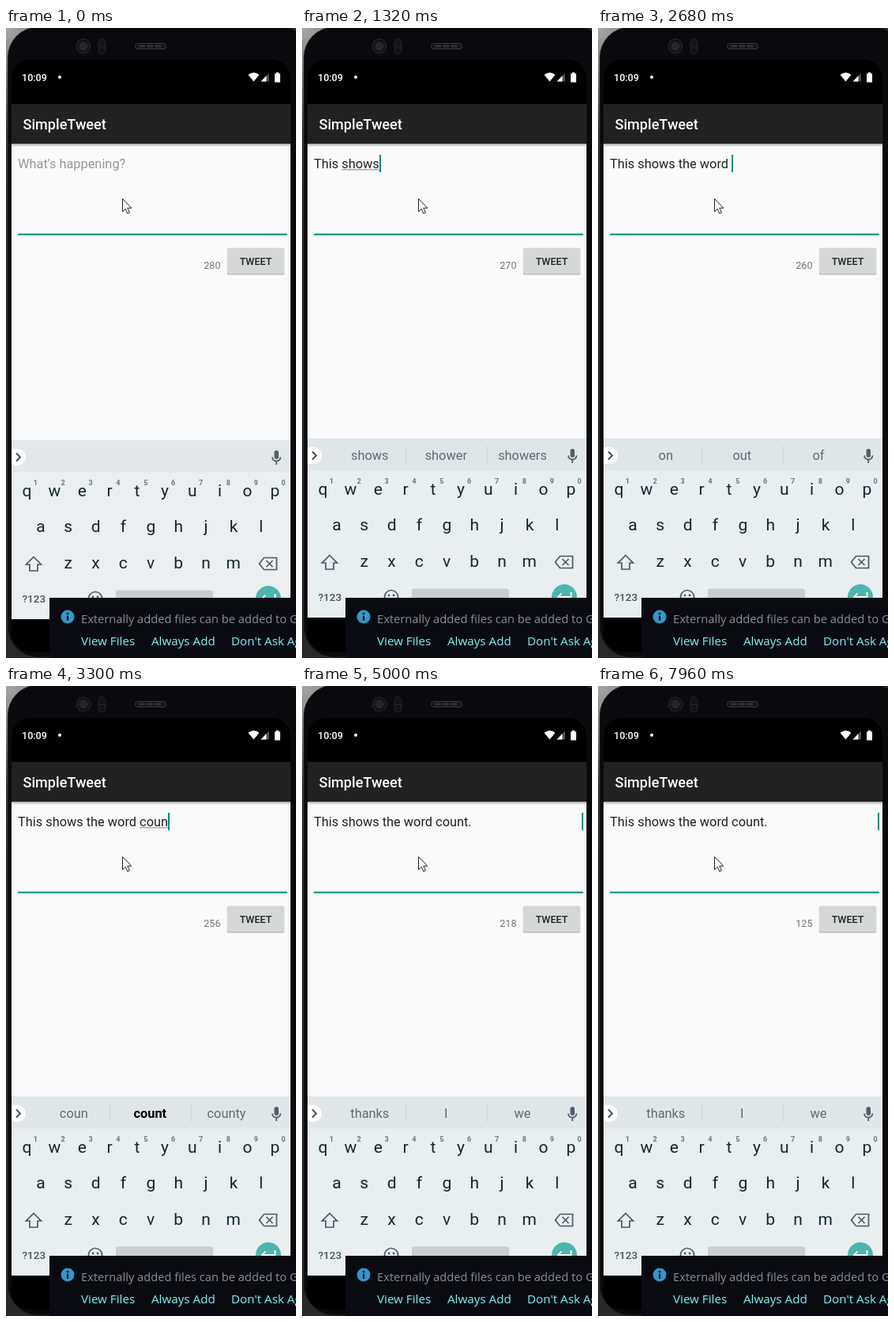
Recreate the animation shown at these times as an HTML page. Size 367x795 px, loop 8000 ms.

```html
<!DOCTYPE html>
<html lang="en">
<head>
<meta charset="utf-8">
<title>Character count</title>
<style>
  html, body { margin: 0; width: 100%; height: 100%; overflow: hidden; background: #0a0a0c; }
  svg { display: block; width: 367px; height: 795px; font-family: Roboto, sans-serif; }
  text { white-space: pre; }
  .mid { text-anchor: middle; }
  .med { font-weight: 500; }
  .key { font-size: 21px; fill: #12262f; }
  .hint { font-size: 9px; font-weight: 700; fill: #6a777e; }
  .body { font-size: 16.35px; }
  .small { font-size: 12.57px; }
  .line { fill: none; stroke: #4b5a63; stroke-width: 1.7; }
  .toast { font-family: "Open Sans", "Noto Sans", sans-serif; font-size: 15.2px; fill: #80f0f8; }
</style>
</head>
<body>
<svg viewBox="0 0 367 795">
  <defs>
    <linearGradient id="shade" x2="0" y2="1">
      <stop stop-color="#000" stop-opacity=".32"/>
      <stop offset="1" stop-color="#000" stop-opacity="0"/>
    </linearGradient>
    <radialGradient id="rim" gradientUnits="userSpaceOnUse" cx="0" cy="0" r="260">
      <stop stop-color="#a6a6a6"/>
      <stop offset=".2" stop-color="#7c7c7e"/>
      <stop offset=".5" stop-color="#3c3c3f"/>
      <stop offset="1" stop-color="#29292c"/>
    </radialGradient>
  </defs>

  <!-- phone body -->
  <rect width="367" height="795" fill="url(#rim)"/>
  <rect x="2.500" y="-1" width="385" height="795" rx="38" fill="#0a0a0c" stroke="#1c1c1e"/>
  <circle cx="98" cy="23" r="9" fill="#141416" stroke="#29292c"/>
  <circle cx="98" cy="23" r="4.500" fill="#24252b" stroke="#34353c"/>
  <rect x="117" y="14" width="9" height="19" rx="4.500" fill="#121214" stroke="#242427"/>
  <path d="M117 23.500h9" stroke="#242427"/>
  <rect x="163.500" y="19.500" width="39" height="7" rx="3.500" fill="#141416" stroke="#39393c"/>
  <path d="M168 23h30" stroke="#333336" stroke-width="3" stroke-dasharray="8 2"/>
  <rect x="7" y="40" width="353" height="747" rx="24"/>

  <!-- status bar -->
  <g fill="#fff">
    <text class="small med" x="20" y="67">10:09</text>
    <circle cx="68" cy="62" r="2"/>
    <path d="M306.500 59Q313.500 53.500 320.500 59L313.500 67.500z"/>
    <path d="M322.500 67.500L333 56.500V67.500z" fill-opacity=".3"/>
    <path d="M322.500 67.500L329.500 60.200V67.500z"/>
    <path d="M340 57.500h2v-1.500h3v1.500h2V68.500h-7z"/>
  </g>

  <!-- app -->
  <rect x="7" y="96" width="353" height="648" fill="#fafafa"/>
  <rect x="7" y="96" width="353" height="50" fill="#212121"/>
  <rect x="7" y="146" width="353" height="4" fill="url(#shade)"/>
  <text class="med" x="21.500" y="128" font-size="18.100" fill="#fff">SimpleTweet</text>
  <text id="note" class="body" x="15" y="177"></text>
  <rect id="under" y="178.300" height="1" fill="#212121" fill-opacity=".55"/>
  <rect id="caret" y="160" width="2" height="22" fill="#00897b"/>
  <rect x="15" y="259.500" width="341" height="2" fill="#00897b"/>
  <text id="count" class="small" x="250.300" y="304" fill="#757575"></text>
  <rect x="279.500" y="278" width="73" height="34" rx="2" fill="#000" fill-opacity=".1"/>
  <rect x="280" y="278.500" width="72" height="32.800" rx="2" fill="#000" fill-opacity=".17"/>
  <rect x="280" y="277.500" width="72" height="32.500" rx="2" fill="#d6d7d7"/>
  <text class="small med mid" x="316" y="299" fill="#212121">TWEET</text>

  <!-- keyboard -->
  <g id="board">
    <rect id="pad" x="7" y="518" width="353" height="226"/>
    <rect id="strip" x="7" y="518" width="353" height="40.500"/>
    <path d="M7 529h7.500a10.500 10.500 0 0 1 0 21H7z" fill="#fff"/>
    <path d="M13 534.500l5 5-5 5" fill="none" stroke="#37474f" stroke-width="1.800"/>
    <path id="bars" d="M131.500 528v22M234 528v22" stroke="#c6cdd1"/>
    <g id="words"></g>
    <rect x="339.500" y="531" width="5.500" height="11" rx="2.750" fill="#546068"/>
    <path class="line" d="M337 539.500a5.200 5.200 0 0 0 10.400 0M342.200 545v4"/>
    <g id="keys"></g>
    <path class="line" d="M35 665.500L44.500 675H40v8H30v-8h-4.500z"/>
    <path class="line" d="M326.500 666.500H342.500V681.500H326.500L320.500 674zM329.500 670l8 8m0-8l-8 8"/>
    <text class="med" x="20.500" y="723" font-size="13.500" fill="#45545d">?123</text>
    <circle class="line" cx="113" cy="718" r="8.500"/>
    <circle cx="110" cy="716" r="1.400" fill="#4b5a63"/>
    <circle cx="116" cy="716" r="1.400" fill="#4b5a63"/>
    <rect x="139" y="707.500" width="123" height="24" rx="3" fill="#c8ced2"/>
    <circle cx="332" cy="718" r="16" fill="#4db6ac"/>
    <path d="M340.500 712v6H324m4.500-4.500l-4.500 4.500 4.500 4.500" fill="none" stroke="#fff" stroke-width="1.900"/>
  </g>

  <!-- editor notice -->
  <rect x="55" y="719" width="312" height="76" fill="#0a0b11"/>
  <circle cx="78" cy="743" r="8.500" fill="#3794c8"/>
  <path d="M78 738v2.200M78 741.800v6" stroke="#0a0b11" stroke-width="2.200"/>
  <text class="toast" x="95" y="751" style="font-size:14.700px;fill:#898c95">Externally added files can be added to Git</text>
  <text class="toast" x="95" y="779">View Files</text>
  <text class="toast" x="184" y="779">Always Add</text>
  <text class="toast" x="285" y="779">Don't Ask Again</text>

  <path d="M147.500 215.500v16.300l3.700-3.600 2.500 5.800 2.600-1.100-2.500-5.700h5z" fill="#fff" stroke="#222" stroke-width="1"/>
</svg>
<script>
const LOOP = 8000;
const SENTENCE = "This shows the word count.";
const HOLD = 3970;
const RATE = 0.0316; // spaces per ms while the space bar is held

// time, typed length, suggestions (* marks the bold one)
const typing = [
  [0, 0, ""],
  [120, 1, "T,The,This"],
  [240, 2, "Th,*The,This"],
  [360, 3, "Thi,*This,Think"],
  [480, 4, "This,Thus,This is"],
  [600, 4, "This,This is,Thistle"],
  [720, 5, "was,is,morning"],
  [840, 6, "s,so,should"],
  [960, 7, "sh,she,should"],
  [1080, 8, "sho,*show,should"],
  [1200, 9, "show,shows,showing"],
  [1320, 10, "shows,shower,showers"],
  [1440, 10, "shows,shows up,showers"],
  [1560, 11, "that,the,how"],
  [1680, 12, "t,the,to"],
  [1800, 13, "th,*the,that"],
  [1920, 14, "the,they,there"],
  [2170, 16, "weekend,way,world"],
  [2290, 17, "wo,work,world"],
  [2410, 18, "wor,*work,world"],
  [2560, 19, "word,words,world"],
  [2680, 20, "on,out,of"],
  [2800, 21, "c,can,could"],
  [2930, 22, "co,come,could"],
  [3180, 23, "cou,*could,couple"],
  [3300, 24, "coun,*count,county"],
  [3420, 25, "count,county,counts"],
  [3540, 26, "and,in,for"],
  [HOLD, 29, "thanks,I,we"]
];

// screen refreshes during the hold: start, number
const runs = [[4090, 1], [4220, 2], [4490, 1], [4640, 6], [5380, 1], [5520, 6],
  [6270, 2], [6520, 3], [6910, 1], [7060, 2], [7330, 1], [7480, 5]];
const ticks = runs.flatMap(([start, n]) => Array.from({ length: n }, (_, i) => start + i * 120));

const el = id => document.getElementById(id);
const set = (id, attrs) => { for (const k in attrs) el(id).setAttribute(k, attrs[k]); };
const label = (cls, x, y, s) => `<text class="${cls}" x="${x}" y="${y}">${s}</text>`;
const last = (list, test) => list.filter(test).pop();

const pen = document.createElement("canvas").getContext("2d");
function width(s) {
  pen.font = "16.35px Roboto, sans-serif";
  return pen.measureText(s).width;
}

const rows = [["qwertyuiop", 26.5, 589], ["asdfghjkl", 43.9, 634], ["zxcvbnm", 78.6, 680]];
el("keys").innerHTML = rows.map(([chars, x, y], row) => [...chars].map((c, i) => {
  const cx = x + i * 34.87;
  return label("key mid", cx, y, c) + (row ? "" : label("hint mid", cx + 10.8, 575, (i + 1) % 10));
}).join("")).join("");

function suggestions(list) {
  if (!list) return "";
  return list.split(",").map((word, i) => {
    const bold = word[0] === "*";
    const style = bold ? 'font-weight="700" fill="#000"' : 'fill="#5f6c74"';
    return `<g ${style}>${label("body mid", [85.8, 182.3, 279][i], 545.3, word.replace("*", ""))}</g>`;
  }).join("");
}

let shown = null;
function draw(t) {
  const [, typed, words] = last(typing, s => s[0] <= t);
  const tick = last(ticks, k => k <= t);
  const len = tick ? Math.round(29 + (tick - HOLD) * RATE) : typed;
  const text = SENTENCE.padEnd(len).slice(0, len);
  const idle = len === 0;

  el("note").textContent = idle ? "What's happening?" : text.trimEnd();
  set("note", { fill: idle ? "#979797" : "#212121" });
  el("count").textContent = 280 - len;

  const end = 15 + width(text);
  set("caret", { x: Math.min(Math.round(end + 0.4), 354), visibility: idle ? "hidden" : "visible" });

  const wordAt = 15 + width(text.slice(0, text.lastIndexOf(" ") + 1));
  const composing = len < SENTENCE.length;
  set("under", { x: wordAt, width: composing ? Math.max(0, end - wordAt) : 0 });

  set("board", { transform: `translate(0 ${idle ? 2 : 0})` });
  set("pad", { fill: idle ? "#eceff1" : "#e9eef1" });
  set("strip", { fill: idle ? "#e3e7e9" : "#e0e5e8" });
  set("bars", { visibility: idle ? "hidden" : "visible" });
  if (words !== shown) el("words").innerHTML = suggestions(shown = words);
}

const began = performance.now();
function frame() {
  draw((performance.now() - began) % LOOP);
  requestAnimationFrame(frame);
}
frame();
</script>
</body>
</html>
```
